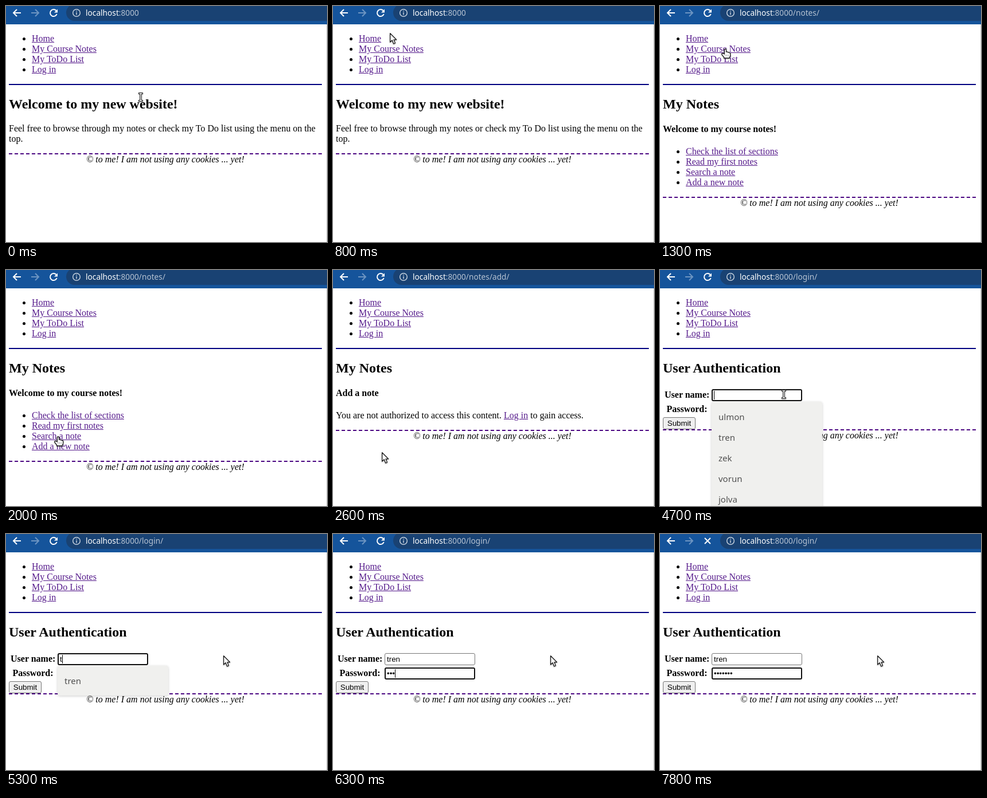
Recreate the animation shown at these times as an HTML page. Size 560 by 412 pixels, loop 8000 ms.

```html
<!DOCTYPE html>
<html lang="en">
<head>
<meta charset="utf-8">
<title>Notes website login</title>
<style>
html, body { margin: 0; width: 100%; height: 100%; overflow: hidden; background: #fff; }
#stage { position: relative; width: 560px; height: 412px; overflow: hidden; background: #fff;
  font: 16px "Liberation Serif", "Times New Roman", serif; color: #000; }
#stage::after { content: ""; position: absolute; left: 559px; top: 32px; width: 1px; height: 380px; background: #d8d8d8; }
.bar { position: absolute; inset: 0 0 auto; height: 32px; background: #15549b; }
.pill { position: absolute; left: 105px; top: -3px; width: 480px; height: 29px; border-radius: 15px; background: #194273; }
.bar svg { position: absolute; left: 0; top: 0; fill: none; stroke: #fff; stroke-width: 2; }
.address { position: absolute; left: 139px; top: 2px; color: #b5c2d2; white-space: pre;
  font: 13.7px/20px "Noto Sans", "Open Sans", sans-serif; }
.address b { font-weight: 400; color: #fff; }
.site { position: absolute; left: 5px; top: 32px; width: 546px; height: 380px; }
header { display: flow-root; border-bottom: 2px solid navy; }
ul { margin: 16px 0; padding-left: 40px; }
li { line-height: 18px; }
.link { color: #551a8b; text-decoration: underline; }
h2 { font-size: 24px; line-height: 27px; margin: 19.92px 0; }
h4 { font-size: 16px; line-height: 18px; margin: 21.28px 0; }
p { line-height: 18px; margin: 16px 0; }
main { display: none; }
main.on { display: flow-root; }
.home p { margin-top: 0; }
footer { border-top: 2px dashed indigo; text-align: center; font-style: italic; line-height: 18px; }
.form { position: relative; height: 73px; }
.login h2 { margin-bottom: 19.92px; }
.form > * { position: absolute; box-sizing: border-box; }
.label { left: 3px; width: 78px; text-align: center; font-weight: 700; line-height: 18px; white-space: nowrap; }
.field, .button { height: 21px; border: 1px solid #767676; border-radius: 3px;
  font: 13.333px/19px "Liberation Sans", Arial, sans-serif; }
.field { left: 85px; width: 158px; padding-left: 3px; white-space: pre; background: #fff; }
.field.focus { border: 2px solid #101010; padding-left: 2px; line-height: 17px; }
.field.caret::after { content: ""; display: inline-block; width: 1px; height: 15px; margin-right: -1px;
  vertical-align: -3px; background: #000; }
.button { left: 0; top: 52px; width: 57px; text-align: center; background: #efefef; }
.menu { position: absolute; left: 90px; top: 230px; width: 193px; padding: 8px 0; background: #f0f0ee;
  border-radius: 4px; box-shadow: 0 1px 4px #0003; color: #505050;
  font: 500 15px/36px "Noto Sans", "Open Sans", sans-serif; }
.menu div { padding-left: 12px; }
.cursor { position: absolute; left: 0; top: 0; overflow: visible; z-index: 2;
  fill: #fff; stroke: #1a1a1a; stroke-width: 1.3; stroke-linejoin: round; filter: drop-shadow(0 1px 1px #0005); }
</style>
</head>
<body>
<div id="stage">
  <div class="site">
    <header>
      <ul>
        <li><span class="link">Home</span></li>
        <li><span class="link">My Course Notes</span></li>
        <li><span class="link">My ToDo List</span></li>
        <li><span class="link">Log in</span></li>
      </ul>
    </header>
    <main class="home">
      <h2>Welcome to my new website!</h2>
      <p>Feel free to browse through my notes or check my To Do list using the menu on the top.</p>
    </main>
    <main class="notes">
      <h2>My Notes</h2>
      <h4>Welcome to my course notes!</h4>
      <ul>
        <li><span class="link">Check the list of sections</span></li>
        <li><span class="link">Read my first notes</span></li>
        <li><span class="link">Search a note</span></li>
        <li><span class="link">Add a new note</span></li>
      </ul>
    </main>
    <main class="add">
      <h2>My Notes</h2>
      <h4>Add a note</h4>
      <p>You are not authorized to access this content. <span class="link">Log in</span> to gain access.</p>
    </main>
    <main class="login">
      <h2>User Authentication</h2>
      <div class="form">
        <span class="label" style="top:4px">User name:</span>
        <span class="field" id="user" style="top:3px"></span>
        <span class="label" style="top:29px">Password:</span>
        <span class="field" id="password" style="top:28px"></span>
        <span class="button">Submit</span>
      </div>
    </main>
    <footer>© to me! I am not using any cookies ... yet!</footer>
  </div>

  <div class="bar">
    <div class="pill"></div>
    <svg width="560" height="32">
      <path d="M26 12H13M19 6L13 12L19 18"/>
      <path d="M44 12H57M51 6L57 12L51 18" stroke="#6d95c2"/>
      <g id="reload"><path d="M87.5 8A6 6 0 1 0 88.7 14"/><path d="M90 5.5V11.5H84Z" fill="#fff" stroke="none"/></g>
      <path id="stop" d="M78 7L88 17M88 7L78 17"/>
      <g stroke="#c4d0dd" stroke-width="1.5"><circle cx="123" cy="12" r="6.3"/><path d="M123 11V15.5M123 8.2V9.8"/></g>
    </svg>
    <div class="address"><b>localhost</b>:8000<span id="path"></span></div>
  </div>

  <div class="menu" id="menu"></div>

  <svg class="cursor" id="cursor" width="1" height="1">
    <path id="arrow" d="M.7 .7V16L4.2 12.8L6.8 19L9.5 17.8L7 11.8H11.6Z"/>
    <g id="hand">
      <path d="M-1.6 9V1.4Q-1.5 0 0 0Q1.4 0 1.5 1.4V5.2Q3.4 4.4 4.3 5.8Q6 5.2 6.7 6.6Q8.6 6.2 8.7 8V11.5Q8.5 13 7.4 14.2V16H-2.4V14.4L-6 9.8Q-6.8 8.2 -5.4 7.6Q-4 7.2 -2.9 8.3Z"/>
      <path d="M-.2 10.5V11.5M2.5 10.5V11.5M5.2 10.5V11.5" stroke-width="1"/>
    </g>
    <path id="text" stroke-width="1" d="M-3.5 -7.5H3.5V-5.5H1.2V5.5H3.5V7.5H-3.5V5.5H-1.2V-5.5H-3.5Z"/>
  </svg>
</div>

<script>
const LOOP = 8000, STEP = 100;
const $ = id => document.getElementById(id);
const names = ["ulmon", "tren", "zek", "vorun", "jolva"];

const pages = [[0, "home", "/"], [1300, "notes", "/notes/"], [2500, "add", "/notes/add/"], [3900, "login", "/login/"]];

// time, x, y, pointer shape
const pointer = [
  [0, 235, 159, "text"], [100, 250, 185, "text"], [300, 277, 256, "arrow"], [500, 180, 130, "arrow"],
  [700, 80, 12, "arrow"], [900, 118, 81, "hand"], [1100, 114, 75, "hand"], [1300, 114, 75, "hand"],
  [1400, 112, 102, "hand"], [1500, 109, 132, "arrow"], [1800, 98, 240, "arrow"], [1900, 94, 270, "hand"],
  [2100, 88, 311, "hand"], [2300, 85, 312, "hand"], [2400, 85, 312, "hand"], [2500, 85, 318, "arrow"],
  [2600, 85, 318, "arrow"], [2800, 130, 371, "arrow"], [3100, 296, 298, "arrow"], [3200, 296, 298, "arrow"],
  [3600, 314, 258, "hand"], [3700, 317, 255, "hand"], [3900, 317, 255, "hand"], [4000, 300, 249, "arrow"],
  [4300, 236, 222, "text"], [4500, 216, 217, "text"], [4700, 216, 217, "text"], [4800, 310, 214, "arrow"],
  [4900, 379, 212, "arrow"], [LOOP, 379, 212, "arrow"]
];

const userKeys = [[0, 0], [5200, 1], [5500, 3], [5700, 4]];
const passwordKeys = [[0, 0], [6100, 1], [6200, 2], [6300, 3], [6500, 4], [6700, 5], [6800, 6], [6900, 7]];

const at = (keys, t) => keys.findLast(key => key[0] <= t);
const show = (el, on) => el.style.display = on ? "" : "none";

function setField(el, text, focus, caret) {
  el.textContent = text;
  el.classList.toggle("focus", focus);
  el.classList.toggle("caret", caret);
}

function movePointer(t) {
  const i = pointer.findLastIndex(key => key[0] <= t);
  const [t0, x0, y0, shape] = pointer[i];
  const [t1, x1, y1] = pointer[i + 1];
  const k = (t - t0) / (t1 - t0);
  const x = Math.round(x0 + (x1 - x0) * k), y = Math.round(y0 + (y1 - y0) * k);
  $("cursor").style.transform = `translate(${x}px, ${y}px)`;
  for (const id of ["arrow", "hand", "text"]) show($(id), id === shape);
}

function render(t) {
  const [, page, path] = at(pages, t);
  document.querySelectorAll("main").forEach(el => el.classList.toggle("on", el.classList.contains(page)));
  $("path").textContent = path === "/" ? "" : path;

  const inUser = t >= 4700 && t < 5900, inPassword = t >= 5900;
  setField($("user"), names[1].slice(0, at(userKeys, t)[1]), inUser, inUser);
  setField($("password"), "•".repeat(at(passwordKeys, t)[1]), inPassword, inPassword && t < 7500);

  show($("menu"), t >= 4700 && t < 5800);
  const items = t < 5300 ? names : [names[1]];
  $("menu").innerHTML = items.map(name => `<div>${name}</div>`).join("");

  show($("reload"), t < 7700);
  show($("stop"), t >= 7700);
  movePointer(t);
}

let last = -1;
const start = performance.now();
function tick() {
  const t = Math.floor((performance.now() - start) % LOOP / STEP) * STEP;
  if (t !== last) render(last = t);
  requestAnimationFrame(tick);
}
tick();
</script>
</body>
</html>
```
